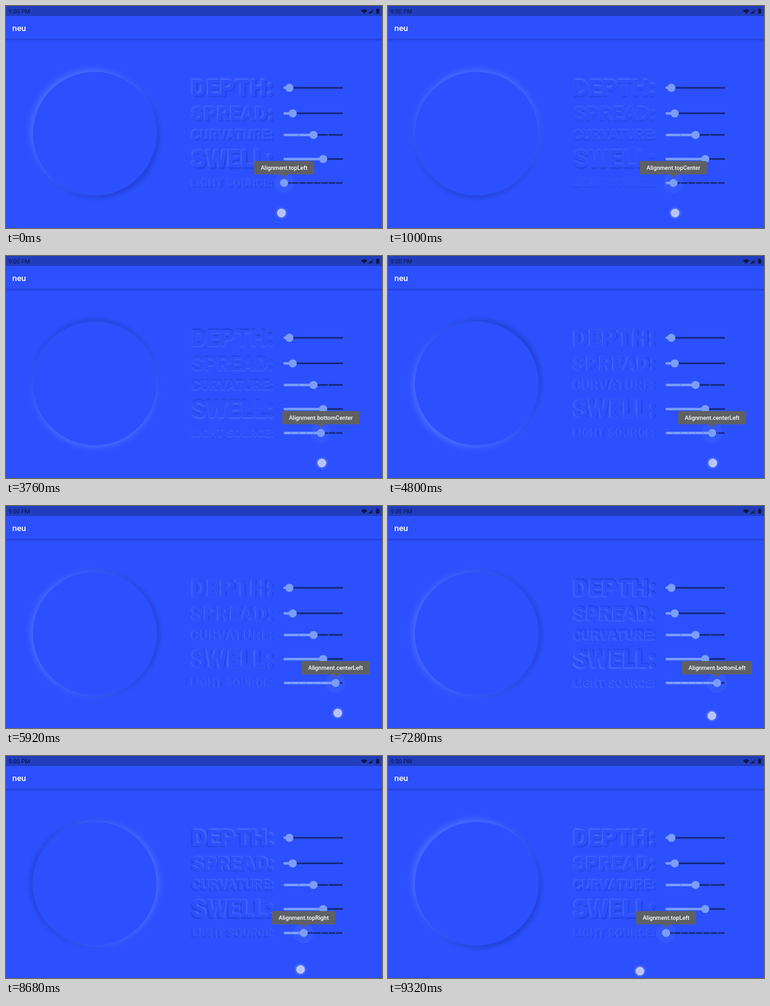
Write an HTML page with a canvas that moves like this. It is 600 px wide and 355 px high and loops after 9.36 s.

```html
<!DOCTYPE html>
<html lang="en">
<head>
<meta charset="utf-8">
<title>neu</title>
<style>
  html, body { margin: 0; width: 100%; height: 100%; overflow: hidden; background: #2c50fe; }
  canvas { display: block; width: 600px; height: 355px; }
</style>
</head>
<body>
<canvas id="stage"></canvas>
<script>
const canvas = document.getElementById('stage');
const ctx = canvas.getContext('2d');
const ratio = window.devicePixelRatio || 1;
canvas.width = 600 * ratio;
canvas.height = 355 * ratio;

const LOOP = 9360;
const BASE = '#2c50fe', LIGHT = '#4a6cff', DARK = '#1d3dd0';
const ACTIVE = '#7b9efb', REST = '#15287f', GRAY = '#5f6064', INK = '#0c1748';
const STEPS = 8, SLIDER_X = 443.7, SLIDER_W = 94, PITCH = SLIDER_W / STEPS;
const GRAB_OFFSET = 2.3;

// Finger drag: [time, x]
const drag = [
  [160, 439.5], [1880, 477.5], [2360, 480], [2920, 491], [3080, 491],
  [3760, 504], [4520, 513], [5240, 526.5], [5800, 527], [6240, 535.5],
  [7000, 535], [7280, 516.8], [7720, 494], [8880, 465], [9320, 402]
];

const lerp = (a, b, p) => a + (b - a) * p;
const clamp = p => Math.max(0, Math.min(1, p));
const ease = p => (p = clamp(p), p * p * (3 - 2 * p));

function touchX(t) {
  const i = drag.findIndex(key => key[0] >= t);
  if (i < 1) return drag.at(i)[1];
  const [t0, x0] = drag[i - 1], [t1, x1] = drag[i];
  return lerp(x0, x1, (t - t0) / (t1 - t0));
}

const touchY = t => 331 + 13 * clamp((t - 6240) / 3080);

const stepAt = t =>
  Math.round(STEPS * clamp((touchX(t) + GRAB_OFFSET - SLIDER_X) / SLIDER_W));

// Moments at which the slider snaps to another step
const changes = [{ time: -1000, step: 0 }];
for (let time = 0; time < LOOP; time += 4) {
  const step = stepAt(time);
  if (step !== changes.at(-1).step) changes.push({ time, step });
}

// The light walks clockwise around the square, starting at the top left
function lightAt(step) {
  const angle = (step - 3) * Math.PI / 4;
  return [Math.round(Math.cos(angle)), Math.round(Math.sin(angle))];
}

const lightName = (dx, dy) => 'Alignment.' +
  ['top', 'center', 'bottom'][dy + 1] + ['Left', 'Center', 'Right'][dx + 1];

function disc(x, y, r, fill) {
  ctx.fillStyle = fill;
  ctx.beginPath();
  ctx.arc(x, y, r, 0, 7);
  ctx.fill();
}

function pill(x, y, w, h, r, fill) {
  ctx.fillStyle = fill;
  ctx.beginPath();
  ctx.roundRect(x, y, w, h, r);
  ctx.fill();
}

function poly(points, fill) {
  ctx.fillStyle = fill;
  ctx.beginPath();
  points.forEach(([x, y]) => ctx.lineTo(x, y));
  ctx.fill();
}

function text(str, x, y, font, fill, align = 'left') {
  ctx.font = font + ' Roboto, sans-serif';
  ctx.textAlign = align;
  ctx.fillStyle = fill;
  ctx.fillText(str, x, y);
}

// Raised surface: dark shadow away from the light, bright one towards it
function clay(dx, dy, offset, blur, draw) {
  for (const [color, side] of [[DARK, -1], [LIGHT, 1]]) {
    ctx.save();
    ctx.shadowColor = color;
    ctx.shadowBlur = blur * ratio;
    ctx.shadowOffsetX = dx * side * offset * ratio;
    ctx.shadowOffsetY = dy * side * offset * ratio;
    draw();
    ctx.restore();
  }
}

// Every label is sized to fill the same column
function label(str, y, dx, dy) {
  ctx.font = '900 100px Roboto, sans-serif';
  const size = 13200 / ctx.measureText(str).width;
  clay(dx, dy, size * 0.04, size * 0.07,
    () => text(str, 295.5, y + size * 0.355, `900 ${size}px`, BASE));
}

function slider(y, x, divisions = 0) {
  pill(x, y - 1.33, 538 - x, 2.67, 1.3, REST);
  pill(442.7, y - 2, x - 442.7, 4, 2, ACTIVE);
  for (let i = 0; divisions && i <= divisions; i++) {
    const tick = SLIDER_X + SLIDER_W * i / divisions;
    disc(tick, y, 0.8, tick < x ? 'rgba(35,65,200,.6)' : 'rgba(123,158,251,.65)');
  }
  disc(x, y, 6.5, ACTIVE);
}

function tooltip(str, x) {
  ctx.font = '500 9.22px Roboto, sans-serif';
  const w = ctx.measureText(str).width + 21.3;
  pill(x - w / 2, 248, w, 21.3, 2, GRAY);
  poly([[x - 5.4, 269], [x + 5.4, 269], [x, 274.5]], GRAY);
  text(str, x, 261.7, '500 9.22px', '#fff', 'center');
}

function bars() {
  const shade = ctx.createLinearGradient(0, 52.4, 0, 57);
  shade.addColorStop(0, 'rgba(10,20,90,.27)');
  shade.addColorStop(1, 'rgba(10,20,90,0)');
  ctx.fillStyle = shade;
  ctx.fillRect(0, 52.4, 600, 4.6);
  ctx.fillStyle = '#213dbc';
  ctx.fillRect(0, 0, 600, 16);

  text('9:00 PM', 4, 11.5, '400 9.33px', INK);
  text('neu', 10, 39.6, '500 13.33px', '#fff');

  ctx.fillStyle = INK;
  ctx.beginPath();
  ctx.moveTo(571.5, 12);
  ctx.arc(571.5, 12, 6.7, -Math.PI * 0.77, -Math.PI * 0.23);
  ctx.fill();
  poly([[578, 12], [586, 12], [586, 4.5]], 'rgba(12,23,72,.4)');
  poly([[578, 12], [583, 12], [583, 7.4]], INK);
  pill(590.5, 5, 5, 7.3, 0.7, INK);
  pill(591.8, 4, 2.4, 1.5, 0, INK);
}

function touch(x, y) {
  ctx.save();
  ctx.shadowColor = 'rgba(255,255,255,.8)';
  ctx.shadowBlur = 4 * ratio;
  disc(x, y, 6.3, '#b6c4fb');
  ctx.restore();
  ctx.strokeStyle = 'rgba(225,231,255,.7)';
  ctx.lineWidth = 1;
  ctx.beginPath();
  ctx.arc(x, y, 6, 0, 7);
  ctx.stroke();
}

function render(t) {
  const now = changes.findLastIndex(change => change.time <= t);
  const { time, step } = changes[now];
  const before = changes[Math.max(0, now - 1)].step;
  const [dx, dy] = lightAt(step), [oldX, oldY] = lightAt(before);
  const turn = ease((t - time) / 160);
  const thumbX = SLIDER_X + PITCH * lerp(before, step, ease((t - time) / 75));

  ctx.setTransform(ratio, 0, 0, ratio, 0, 0);
  ctx.fillStyle = BASE;
  ctx.fillRect(0, 0, 600, 355);
  bars();

  clay(lerp(oldX, dx, turn), lerp(oldY, dy, turn), 3.8, 8,
    () => disc(141.6, 204, 98.7, BASE));
  label('DEPTH:', 130.5, dx, dy);
  label('SPREAD:', 171.5, dx, dy);
  label('CURVATURE:', 206, dx, dy);
  label('SWELL:', 244.5, dx, dy);
  label('LIGHT SOURCE:', 283, dx, dy);

  slider(130.8, 452.2);
  slider(171.7, 457.5);
  slider(206.2, 490.7, 4);
  slider(244.7, 506.2);
  disc(thumbX, 283, 16, 'rgba(123,158,251,.11)');
  slider(283, thumbX, STEPS);
  tooltip(lightName(dx, dy), thumbX);
  touch(touchX(t), touchY(t));
}

function frame() {
  render(performance.now() % LOOP);
  requestAnimationFrame(frame);
}
frame();
</script>
</body>
</html>
```
